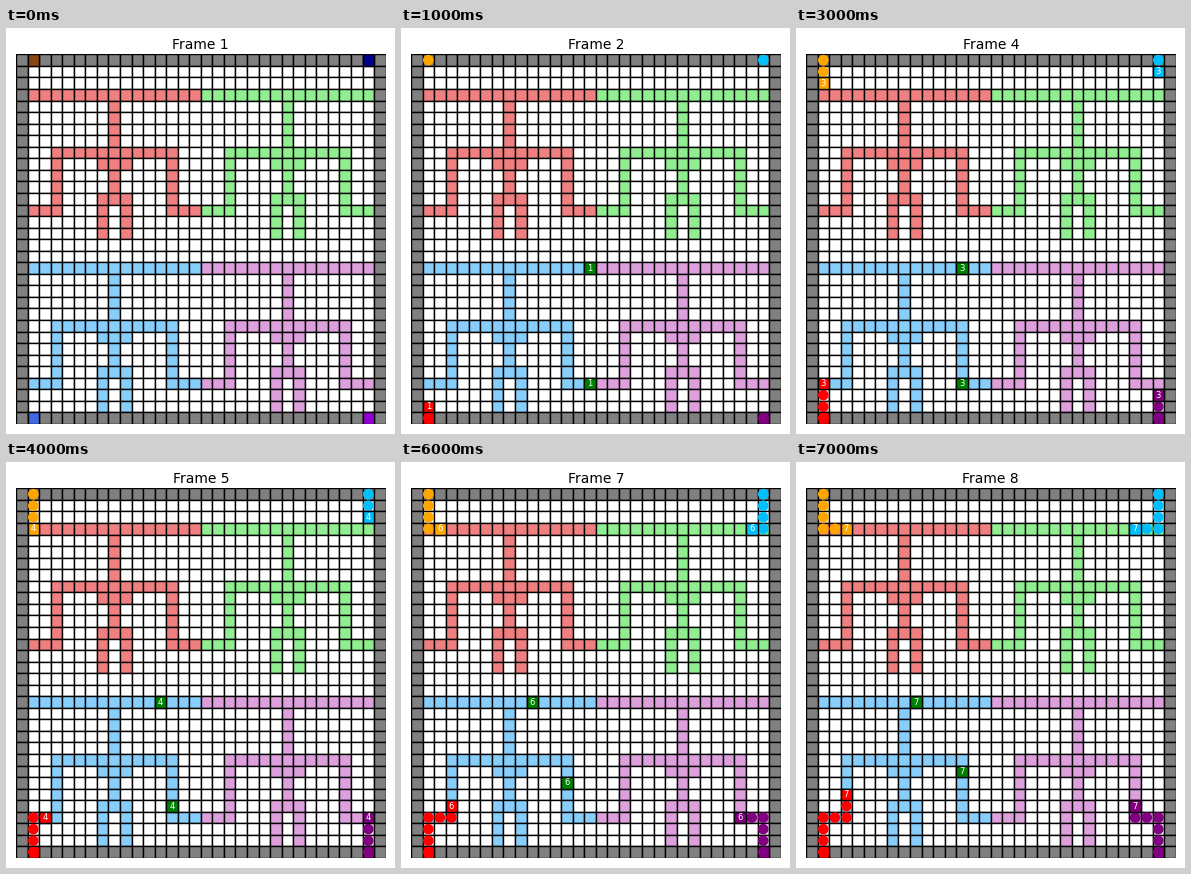
These frames come from a looping animation (389 px wide and 406 px high, 8 s). A matplotlib script:

```python
import matplotlib.pyplot as plt
from matplotlib.animation import ArtistAnimation
from matplotlib.patches import Circle, Rectangle

W, H, DPI = 389, 406, 100
N = 32                    # cells per side
SIDE = 369.6              # board size in pixels
STEPS = 8
LAST = N - 1

plt.rcParams["font.family"] = "DejaVu Sans"
fig = plt.figure(figsize=((W + 0.01) / DPI, (H + 0.01) / DPI), dpi=DPI,
                 facecolor="white")
ax = fig.add_axes([10 / W, 10 / H, SIDE / W, SIDE / H])
ax.set_xlim(0, N)
ax.set_ylim(N, 0)
ax.axis("off")


def square(row, col, color, z=1):
    return ax.add_patch(Rectangle((col, row), 1, 1, facecolor=color,
                                  edgecolor="black", linewidth=1, zorder=z))


def dot(row, col, color):
    return ax.add_patch(Circle((col + 0.5, row + 0.5), 0.4, color=color,
                               linewidth=1, zorder=3))


def tagged(row, col, color, label):
    tag = ax.text(col + 0.5, row + 0.5, label, color="white", fontsize=6,
                  ha="center", va="center", zorder=5)
    return [square(row, col, color, 4), tag]


def road_cells(top, left):
    """Cells of one district's road network."""
    cells = {(0, c) for c in range(15)}
    cells |= {(r, 7) for r in range(10)}
    cells |= {(5, c) for c in range(2, 13)}
    cells |= {(6, c) for c in (6, 7, 8)}
    cells |= {(r, c) for r in range(5, 11) for c in (2, 12)}
    cells |= {(10, c) for c in (0, 1, 13, 14)}
    cells |= {(r, c) for r in range(9, 13) for c in (6, 8)}
    return {(top + r, left + c) for r, c in cells}


def walk(start, moves):
    """Positions visited from start, one letter per step ('.' waits)."""
    shift = {"U": (-1, 0), "D": (1, 0), "L": (0, -1), "R": (0, 1), ".": (0, 0)}
    path = [start]
    for m in moves:
        dr, dc = shift[m]
        path.append((path[-1][0] + dr, path[-1][1] + dc))
    return path


# Static board
board = {(r, c): "gray" if {r, c} & {0, LAST} else "white"
         for r in range(N) for c in range(N)}
districts = [(3, 1, "lightcoral"), (3, 16, "lightgreen"),
             (18, 1, "lightskyblue"), (18, 16, "plum")]
for top, left, color in districts:
    for cell in road_cells(top, left):
        board[cell] = color
for (r, c), color in board.items():
    square(r, c, color)

# Depot cell, depot colour, agent colour, moves
agents = [
    ((0, 1), "saddlebrown", "orange", ".DDD.RR"),
    ((0, 30), "darkblue", "deepskyblue", "..DDDLL"),
    ((LAST, 1), "royalblue", "red", "UUURRUU"),
    ((LAST, 30), "darkviolet", "purple", ".UUULLU"),
]
obstacles = [walk((18, 16), "LLLLLLL"), walk((28, 16), "LLLUUUU")]

frames = []
for t in range(STEPS):
    shown = [fig.text((10 + SIDE / 2) / W, 1 - 20.6 / H, f"Frame {t + 1}",
                      fontsize=10, ha="center", va="baseline")]
    for home, depot, color, moves in agents:
        if t == 0:
            shown.append(square(*home, depot, 2))
            continue
        path = walk(home, moves)
        if home[0] == LAST:
            shown.append(square(*home, color, 2))
        shown += [dot(*cell, color) for cell in sorted(set(path[:t]))]
        if path[t] != home:
            shown += tagged(*path[t], color, str(t))
    if t:
        for path in obstacles:
            shown += tagged(*path[t], "green", str(t))
    frames.append(shown)

anim = ArtistAnimation(fig, frames, interval=1000, repeat=True, repeat_delay=0)
plt.show()
```
